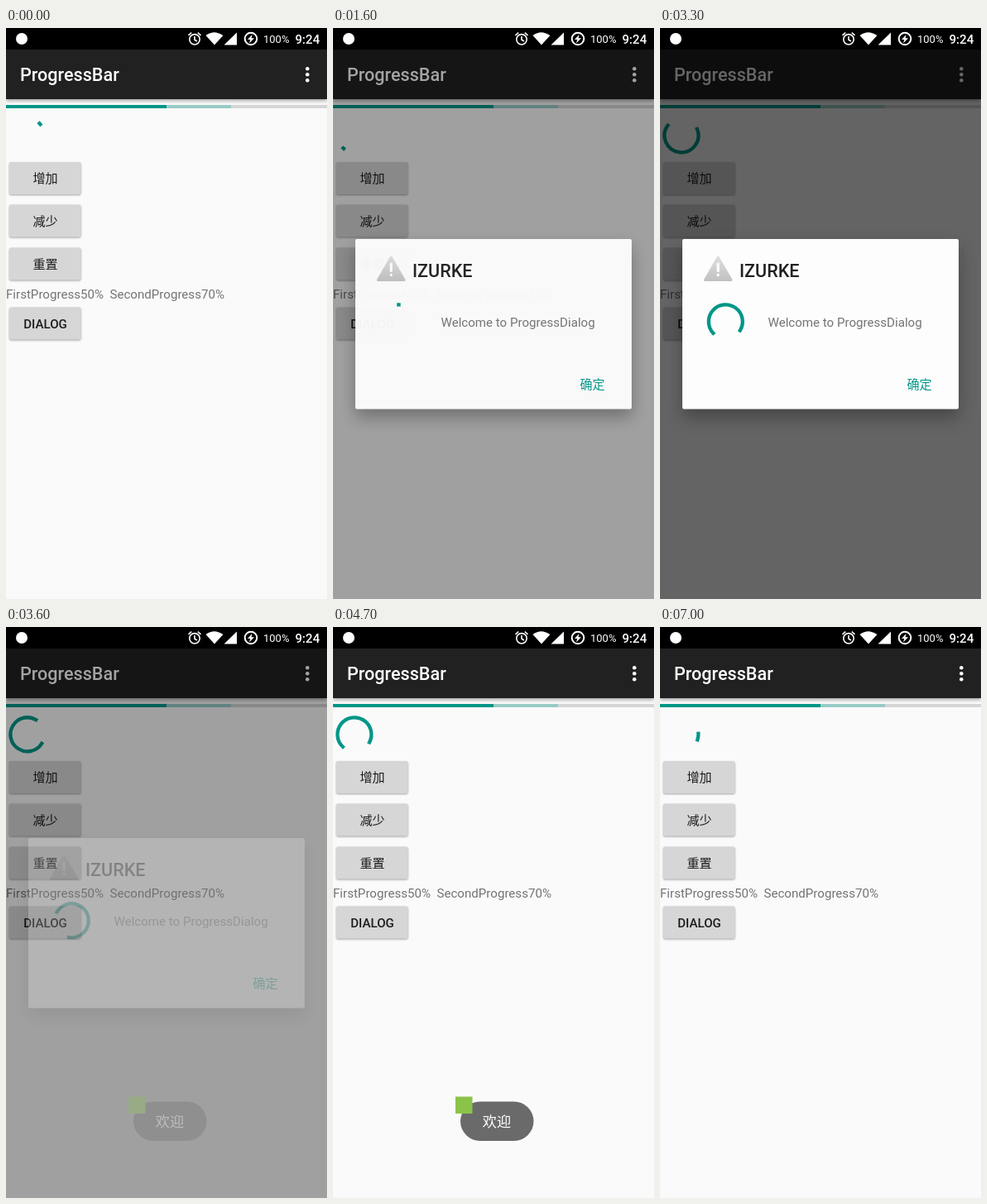
An HTML page that plays this animation: 388 by 690 pixels, repeating every 7.1 s.

```html
<!DOCTYPE html>
<html lang="zh">
<head>
<meta charset="utf-8">
<title>ProgressBar</title>
<style>
html, body { margin: 0; width: 100%; height: 100%; overflow: hidden; background: #fafafa; }
svg { display: block; width: 388px; height: 690px; }
text { font: 15.1px Roboto, "Noto Sans CJK SC", "Noto Sans CJK", sans-serif; white-space: pre; }
.mid { text-anchor: middle; }
.bold { font-weight: 500; }
.title { font-size: 21.6px; font-weight: 500; }
.spin { fill: none; stroke: #009688; stroke-width: 4.3; stroke-linecap: square; }
.btn rect { fill: #d6d6d6; filter: drop-shadow(0 1px 1px rgba(0,0,0,.35)); }
.btn text { fill: #1c1c1c; }
#card { filter: drop-shadow(0 10px 10px rgba(0,0,0,.3)); }
#bar { filter: drop-shadow(0 2px 2px rgba(0,0,0,.35)); }
</style>
</head>
<body>
<svg viewBox="0 0 388 690">
  <defs>
    <linearGradient id="grey" x2="0" y2="1">
      <stop stop-color="#dedede"/><stop offset="1" stop-color="#c2c2c2"/>
    </linearGradient>
  </defs>
  <rect width="388" height="690" fill="#fafafa"/>

  <rect y="93" width="388" height="4" fill="#d5d5d5"/>
  <rect y="93" width="272" height="4" fill="#98cbc6"/>
  <rect y="93" width="194" height="4" fill="#009688"/>
  <rect id="bar" y="26" width="388" height="60" fill="#212121"/>
  <text class="title" x="17" y="64" fill="#fff">ProgressBar</text>
  <g fill="#fff">
    <circle cx="364.3" cy="49.3" r="2.3"/><circle cx="364.3" cy="56.3" r="2.3"/><circle cx="364.3" cy="63.3" r="2.3"/>
  </g>

  <path id="mainSpin" class="spin"/>
  <g id="buttons"></g>
  <text x="0" y="327" fill="#737373">FirstProgress50%  SecondProgress70%</text>

  <rect id="dim" y="26" width="388" height="664"/>

  <g id="dialog">
    <rect id="card" x="27" y="255" width="334" height="205.5" rx="2" fill="#fdfdfd"/>
    <path d="M70.2 277L86 304.5H54.5Z" fill="url(#grey)" stroke="url(#grey)" stroke-width="3" stroke-linejoin="round"/>
    <path d="M70.2 285v8.5M70.2 298.4v.2" stroke="#fff" stroke-width="3.2" stroke-linecap="round"/>
    <text class="title" x="96" y="300.5" fill="#212121">IZURKE</text>
    <path id="dialogSpin" class="spin"/>
    <text x="130.5" y="360.5" fill="#737373">Welcome to ProgressDialog</text>
    <text class="mid" x="313.5" y="436" fill="#009688">确定</text>
  </g>

  <g id="toast">
    <rect x="154" y="573.5" width="88.5" height="47.5" rx="23.7" fill="#6a6a6a"/>
    <rect x="148" y="567.5" width="20.5" height="20.5" fill="#8bc34a"/>
    <text class="mid" x="198" y="603.5" fill="#fff" style="font-size:17.2px">欢迎</text>
  </g>

  <rect width="388" height="26" fill="#000"/>
  <g fill="#fff">
    <circle cx="19" cy="13" r="7"/>
    <path d="M241.5 9Q252 1.500 262.500 9L252 20.500ZM279 5.500V20.500H263.500Z"/>
    <path d="M297.500 8L292 14H295.300L294 18.500L300 12.300H296.600Z"/>
    <text x="311" y="18" style="font-size:13px">100%</text>
    <text class="bold" x="349.500" y="18.500">9:24</text>
  </g>
  <g fill="none" stroke="#fff" stroke-width="1.6">
    <circle cx="228" cy="13.800" r="6.200"/>
    <path d="M228 10v4.200l3 1.800M220.500 8.800l3.700-3.200M235.500 8.800l-3.700-3.200"/>
    <circle cx="296" cy="13" r="7.300" stroke-width="2"/>
  </g>
</svg>
<script>
const LOOP = 7100, STEP = 100, CYCLE = 1333;
const $ = id => document.getElementById(id);
const clamp = x => Math.min(1, Math.max(0, x));
const ramp = (t, from, len) => clamp((t - from) / len);

$('buttons').innerHTML = [['增加', 162], ['减少', 213.5], ['重置', 265.5], ['DIALOG', 337.5]]
  .map(([label, y], i) => `<g class="btn"><rect x="4" y="${y}" width="86.500" height="39" rx="2"/>
    <text class="mid ${i === 3 ? 'bold' : ''}" x="47.500" y="${y + 25}">${label}</text></g>`).join('');

// Cubic ease (.2,0 .1,1) squeezed into the first half of a cycle
function trim(x) {
  if (x <= 0) return 0;
  if (x >= 0.5) return 1;
  let lo = 0, hi = 1;
  for (let i = 0; i < 24; i++) {
    const s = (lo + hi) / 2, r = 1 - s;
    if (0.6 * s * r * r + 0.3 * s * s * r + 0.5 * s ** 3 < x) lo = s; else hi = s;
  }
  return lo * lo * (3 - 2 * lo);
}

// Ring arc after p cycles: steady turn of 234° plus 270° of trim per cycle
function spin(el, cx, cy, base, p) {
  const n = Math.floor(p), f = p - n, turn = base + 234 * p + 270 * n;
  const a = turn + 270 * trim(f - 0.5);
  const b = Math.max(a + 0.6, turn + 270 * trim(f));
  const at = deg => {
    const r = deg * Math.PI / 180;
    return (cx + 20.5 * Math.sin(r)).toFixed(2) + ' ' + (cy - 20.5 * Math.cos(r)).toFixed(2);
  };
  el.setAttribute('d', `M${at(a)}A20.5 20.5 0 ${b - a > 180 ? 1 : 0} 1 ${at(b)}`);
}

function fade(id, v) {
  $(id).style.opacity = v;
  $(id).style.display = v > 0 ? '' : 'none';
}

function draw(t) {
  // The main spinner stalls briefly while the dialog opens
  const clock = Math.min(t, 1480) + Math.max(0, t - 1600);
  spin($('mainSpin'), 25.9, 129.8, 284, 0.92 + clock / CYCLE);
  spin($('dialogSpin'), 79.3, 354.8, 0, t <= 1600 ? 0 : (t - 1494) / CYCLE);

  const shown = 1 - (1 - ramp(t, 1480, 150)) ** 2;
  fade('dialog', t < 3520 ? shown : (1 - ramp(t, 3520, 150)) ** 2);
  fade('dim', 0.6 * (ramp(t, 1480, 200) - ramp(t, 3520, 200)));
  fade('toast', ramp(t, 3480, 410) - ramp(t, 5580, 400));
}

const start = performance.now();
function tick() {
  const t = (performance.now() - start) % LOOP;
  draw(Math.floor(t / STEP) * STEP);
  requestAnimationFrame(tick);
}
tick();
</script>
</body>
</html>
```
